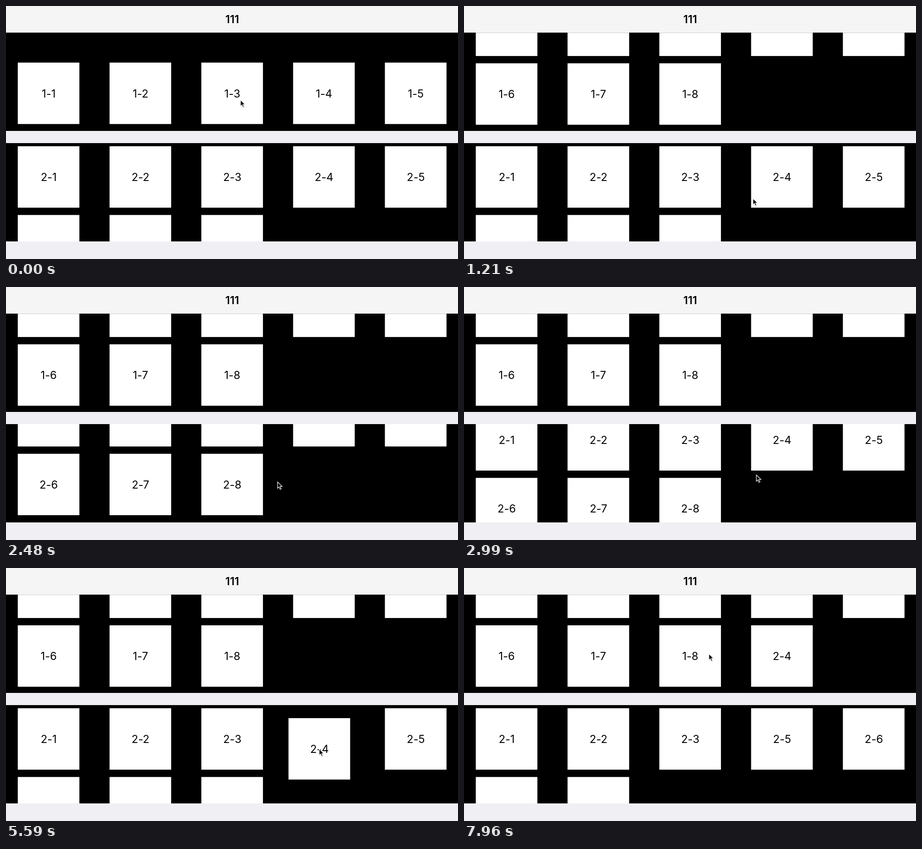
These frames come from a looping animation (999 px wide and 561 px high, 8000 ms). An HTML page with a canvas:

```html
<!DOCTYPE html>
<html lang="en">
<head>
<meta charset="utf-8">
<title>Drag between lists</title>
<style>
html, body { margin: 0; width: 100%; height: 100%; overflow: hidden; background: #efeff4; }
canvas { display: block; }
</style>
</head>
<body>
<canvas id="stage" width="999" height="561"></canvas>
<script>
const ctx = document.getElementById('stage').getContext('2d');
const LOOP = 8000, SIZE = 136.2, COL = 202.85, ROW = 152.4;
const LIFT = 5590, DROP = 7220;

// The screen refreshes in bursts: start, end, number of even steps
const bursts = [[0, 1030, 7], [1210, 2180, 5], [2330, 3490, 7], [LIFT, LIFT, 1], [6190, 7960, 12]];

// Pointer stops: time, x, y
const stops = [[0, 518, 208], [883, 674, 147], [1100, 640, 432], [1792, 618, 352],
  [2496, 600, 432], [3490, 692, 401], [6190, 692, 401], [DROP, 750, 254], [7960, 541, 190]];

function ease(t, start, end) {
  const p = Math.min(1, Math.max(0, (t - start) / (end - start)));
  return p * p * (3 - 2 * p);
}

// Last refresh at or just after t
function refresh(t) {
  const [start, end, steps] = bursts.findLast(b => b[0] <= t);
  const step = (end - start) / steps;
  return step ? Math.min(end, start + step * Math.floor((t - start) / step + .12)) : start;
}

const upperTop = t => 66 + 59.5 * (1 - ease(t, 0, 450)) - 91.3 * ease(t, 746, 1210);
const lowerTop = t => 311 - 93.6 * (ease(t, 1210, 1937) - ease(t, 2500, 3400));

function pointerAt(t) {
  let [, x, y] = stops[0];
  for (let i = 1; i < stops.length; i++) {
    const [start, x0, y0] = stops[i - 1], [end, x1, y1] = stops[i];
    const p = ease(t, start, end);
    x += (x1 - x0) * p;
    y += (y1 - y0) * p;
  }
  return [x, y];
}

function text(label, x, y, weight) {
  ctx.font = weight + ' 24px Inter, "Liberation Sans", sans-serif';
  ctx.textRendering = 'optimizeSpeed'; // keeps the hyphen at its default height
  ctx.textAlign = 'center';
  ctx.fillStyle = '#000';
  ctx.fillText(label, x, y);
}

function tile(label, x, y) {
  ctx.fillStyle = '#fff';
  ctx.fillRect(x, y, SIZE, SIZE);
  text(label, x + SIZE / 2 + .3, y + 77, 400);
}

function panel(y, top, labels) {
  ctx.save();
  ctx.beginPath();
  ctx.rect(0, y, 999, 218);
  ctx.clip();
  ctx.fillStyle = '#000';
  ctx.fillRect(0, y, 999, 218);
  labels.forEach((label, i) => {
    if (label) tile(label, 26 + i % 5 * COL, top + Math.floor(i / 5) * ROW);
  });
  ctx.restore();
}

const arrow = new Path2D('M0 0V14.2L3.2 11.1L5.6 16.5L8 15.5L5.7 10.1H10.2Z');
function drawPointer(x, y) {
  ctx.save();
  ctx.translate(x + .2, y + .2);
  ctx.shadowColor = 'rgba(0,0,0,.35)';
  ctx.shadowBlur = 2;
  ctx.shadowOffsetY = 1;
  ctx.fillStyle = '#000';
  ctx.strokeStyle = '#fff';
  ctx.lineWidth = 1.2;
  ctx.fill(arrow);
  ctx.shadowColor = 'transparent';
  ctx.stroke(arrow);
  ctx.restore();
}

const row = list => Array.from({ length: 8 }, (_, i) => `${list}-${i + 1}`);

function draw(t) {
  const [x, y] = pointerAt(t);
  const upper = row(1), lower = row(2);
  const dragging = t >= LIFT && t < DROP;
  if (dragging) lower[3] = '';
  if (t >= DROP) upper.push(...lower.splice(3, 1));

  ctx.fillStyle = '#efeff4';
  ctx.fillRect(0, 0, 999, 561);
  panel(59, upperTop(t), upper);
  panel(304, lowerTop(t), lower);
  ctx.fillStyle = '#f5f5f5';
  ctx.fillRect(0, 0, 999, 59);
  ctx.fillStyle = 'rgba(0,0,0,.2)';
  ctx.fillRect(0, 59, 999, 1);
  text('111', 500, 37.5, 600);
  if (dragging) tile('2-4', x + .5 - SIZE / 2, y - SIZE / 2);
  drawPointer(x, y);
}

function frame(now) {
  draw(refresh(now % LOOP));
  requestAnimationFrame(frame);
}
requestAnimationFrame(frame);
</script>
</body>
</html>
```
